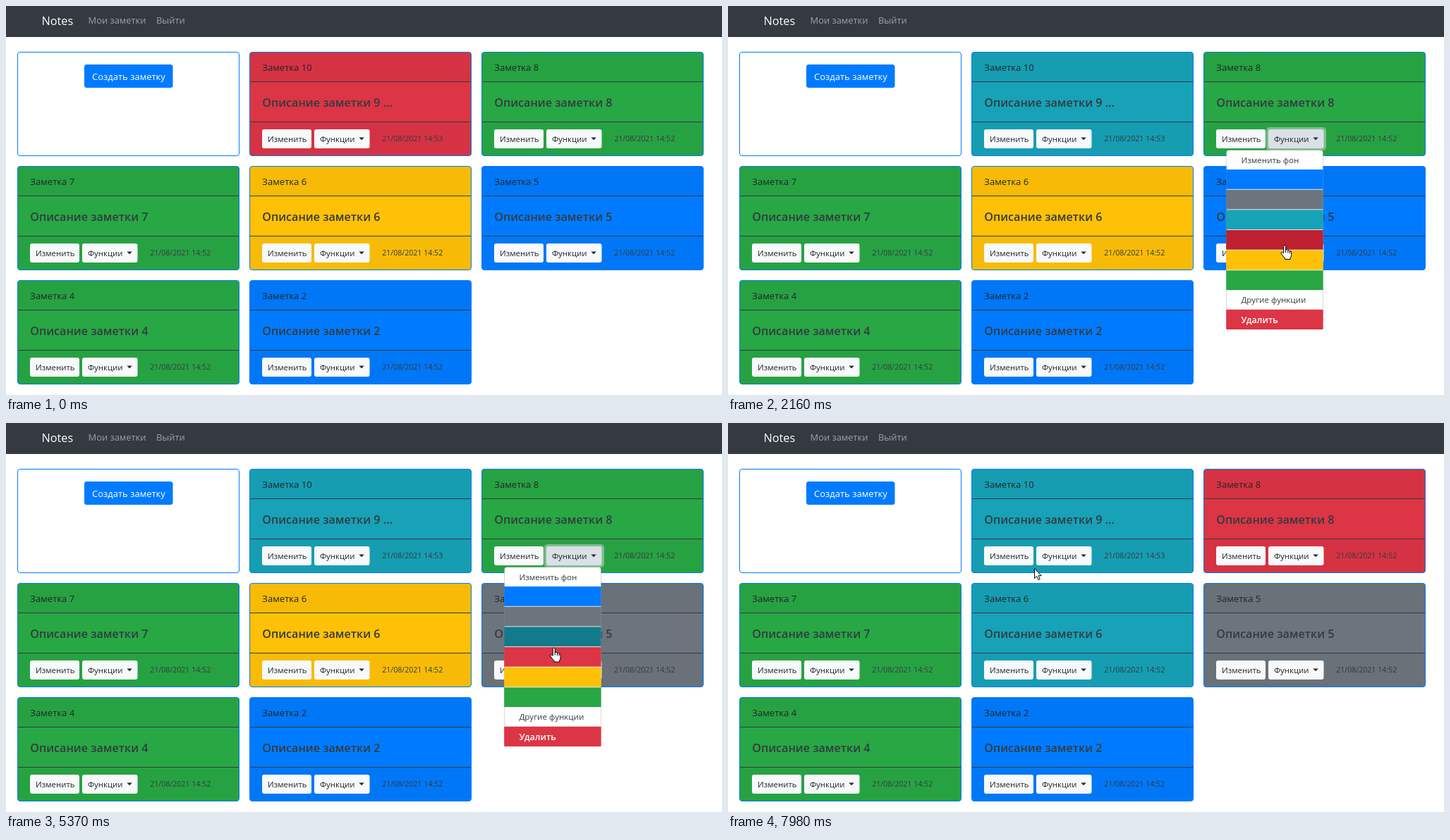
Write an HTML page that moves like this. It is 1015 px wide and 552 px high and loops after 8000 ms.

```html
<!DOCTYPE html>
<html lang="ru">
<head>
<meta charset="utf-8">
<title>Notes</title>
<style>
html, body { margin: 0; width: 100%; height: 100%; overflow: hidden; background: #fff; }
svg { display: block; width: 1015px; height: 552px; font-family: "Open Sans", "Noto Sans", sans-serif; }
text { fill: #343a40; white-space: pre; }
.brand { font-size: 16.3px; font-weight: 500; fill: #fff; }
.link { font-size: 12.9px; fill: #9fa2a5; }
.create { font-size: 13px; fill: #fff; }
.title { font-size: 13.1px; fill: #212529; }
.head { font-size: 16.1px; font-weight: 600; }
.small { font-size: 11.4px; fill: #212529; }
.date { font-size: 10.6px; }
.group { font-size: 11.6px; font-weight: 500; }
.delete { font-size: 12.5px; font-weight: 600; fill: #fff; }
.line { stroke: #343a40; }
.ring { fill: #d8d9db; fill-opacity: .5; }
</style>
</head>
<body>
<svg id="stage" viewBox="0 0 1015 552"></svg>
<script>
const LOOP = 8000, PITCH = 28.65, CLICK = 100, RELOAD = 110;
const BLUE = '#007bff', GRAY = '#6c757d', TEAL = '#17a2b8', RED = '#dc3545', YELLOW = '#ffc107', GREEN = '#28a745';

const swatches = [
  [BLUE, '#0062cc'], [GRAY, '#545b62'], [TEAL, '#117a8b'],
  [RED, '#bd2130'], [YELLOW, '#d39e00'], [GREEN, '#1e7e34']
];
const colors = [RED, GREEN, GREEN, YELLOW, BLUE, GREEN, BLUE];
const numbers = [10, 8, 7, 6, 5, 4, 2];

// Each visit opens a card's menu, glides to a row, then picks one; without a pick it closes by the button.
const visits = [
  { card: 0, open: 760, look: 2, reach: 400, pick: 2, close: 1440 },
  { card: 1, open: 1790, look: 7, reach: 620, close: 2920 },
  { card: 4, open: 3320, look: 3, reach: 620, pick: 1, close: 4270 },
  { card: 1, open: 5000, look: 3, reach: 400, pick: 3, close: 5750 },
  { card: 3, open: 6545, look: 2, reach: 400, pick: 2, close: 7345 }
];

const cardX = i => 16 + 329 * ((i + 1) % 3);
const cardY = i => 65 + 162 * Math.floor((i + 1) / 3);
const rowY = k => 167 + PITCH * k;

const buttonPoint = i => [cardX(i) + 136, cardY(i) + 120];
const rowPoint = (i, k) => [cardX(i) + 102, cardY(i) + rowY(k) + 4];

const path = [[0, 975, 575]];
for (const { card, open, look, reach, pick, close } of visits) {
  const end = pick === undefined ? buttonPoint(card) : rowPoint(card, pick);
  path.push(
    [open - 150, ...buttonPoint(card)], [open + 30, ...buttonPoint(card)],
    [open + reach, ...rowPoint(card, look)],
    [close - 150, ...end], [close, ...end]);
}
path.push([7680, 182, 318], [7980, 434, 206], [LOOP, 434, 206]);

const rect = (x, y, w, h, attrs) => `<rect x="${x}" y="${y}" width="${w}" height="${h}" ${attrs}/>`;
const text = (x, y, cls, str) => `<text x="${x}" y="${y}" class="${cls}">${str}</text>`;
const frame = attrs => rect(.5, .5, 314, 147, `rx="3.5" stroke="${BLUE}" ${attrs}`);

const card = (n, i) => `<g transform="translate(${cardX(i)} ${cardY(i)})">
  ${frame(`id="card${i}"`)}
  ${rect(1, 1, 313, 41, 'rx="3" fill-opacity=".03"')}
  ${rect(1, 100, 313, 47, 'rx="3" fill-opacity=".03"')}
  <path class="line" d="M1 42.5H314M1 99.5H314"/>
  ${text(18.3, 27, 'title', 'Заметка ' + n)}
  ${text(18.3, 78, 'head', 'Описание заметки ' + (i ? n : '9 ...'))}
  ${rect(89, 107, 85, 33, `rx="5" class="ring" id="ring${i}"`)}
  ${rect(18, 110, 70, 27, `rx="3" id="edit${i}"`)}
  ${rect(92, 110, 78.5, 27, `rx="3" id="drop${i}"`)}
  ${text(26, 128, 'small', 'Изменить')}
  ${text(100, 128, 'small', 'Функции')}
  <path d="M155.4 121.4h7.4l-3.7 3.8z" fill="#212529"/>
  ${text(188.2, 127.4, 'date', '21/08/2021 14:' + (i ? 52 : 53))}
</g>`;

const menu = `<g id="menu">
  ${rect(32.5, 139.5, 137, 254, 'rx="3.5" fill="#fff" stroke="#000" stroke-opacity=".15"')}
  ${swatches.map((s, k) => rect(32.2, rowY(k), 137.4, 27.8, `id="row${k}"`)).join('')}
  ${rect(32.2, 365.8, 137.4, 28.2, `rx="1" fill="${RED}"`)}
  ${text(53.4, 157.8, 'group', 'Изменить фон')}
  ${text(53.4, 356.2, 'group', 'Другие функции')}
  ${text(53.4, 384.7, 'delete', 'Удалить')}
</g>`;

const pointer = `<g id="pointer" stroke="#000" fill="#fff" stroke-linejoin="round">
  <circle id="click" r="11" fill="#e6d21a" fill-opacity=".8" stroke="none"/>
  <path id="arrow" d="M.5 .5V14.5L3.7 11.5L6 16.6L8.2 15.6L6 10.7H10.3Z"/>
  <path id="hand" d="M-1.4 10.5V1.2Q-1.4-.5 0-.5T1.6 1.2V6Q4.2 5 4.8 6.8Q7 6 7.4 7.8Q9.5 7.4 9.5 9.4V13.5Q9.4 16 8 17.5V19.5H.5V18Q-2.2 15-4.8 11.5Q-5.4 9.6-3.8 9.4Q-2.6 9.4-1.4 10.8M1.6 6V10M4.8 7V10.5M7.4 8V11"/>
</g>`;

document.getElementById('stage').innerHTML =
  rect(0, 0, 1015, 44, 'fill="#343a40"') +
  text(50.5, 27, 'brand', 'Notes') +
  text(116.5, 25.2, 'link', 'Мои заметки') + text(213, 25.2, 'link', 'Выйти') +
  `<g transform="translate(${cardX(-1)} ${cardY(-1)})">${frame('fill="#fff"')}</g>` +
  rect(111, 83, 125.5, 33, `rx="3.5" fill="${BLUE}"`) +
  text(122, 105, 'create', 'Создать заметку') +
  numbers.map(card).join('') + menu + pointer;

const el = id => document.getElementById(id);
const show = (id, on) => el(id).setAttribute('visibility', on ? 'visible' : 'hidden');
const fill = (id, color) => el(id).setAttribute('fill', color);
const move = (id, x, y) => el(id).setAttribute('transform', `translate(${x} ${y})`);

function pointerAt(t) {
  const i = path.findIndex(p => p[0] > t);
  const [t0, x0, y0] = path[i - 1], [t1, x1, y1] = path[i];
  const u = (t - t0) / (t1 - t0), s = u * u * (3 - 2 * u);
  return [x0 + (x1 - x0) * s, y0 + (y1 - y0) * s];
}

const inside = (x, y, left, top, w, h) => x >= left && x < left + w && y >= top && y < top + h;

function hoverAt([x, y], open) {
  if (open >= 0) {
    const mx = x - cardX(open), my = y - cardY(open);
    if (inside(mx, my, 32, 139, 138, 255)) {
      const k = Math.floor((my - rowY(0)) / PITCH);
      return k < 0 || k === swatches.length ? '' : 'row' + k;
    }
  }
  for (let i = 0; i < numbers.length; i++) {
    const cx = x - cardX(i), cy = y - cardY(i);
    if (inside(cx, cy, 18, 110, 70, 27)) return 'edit' + i;
    if (inside(cx, cy, 92, 110, 78.5, 27)) return 'drop' + i;
  }
  return '';
}

function draw() {
  const t = performance.now() % LOOP;
  const cardDuring = (before, after) =>
    visits.find(v => t >= v.open - before && t < v.close + after)?.card ?? -1;
  const open = cardDuring(0, 0), focus = cardDuring(55, RELOAD);
  const hover = hoverAt(pointerAt(Math.max(0, t - 30)), open);

  numbers.forEach((n, i) => {
    const paint = visits.find(v => v.card === i && v.pick !== undefined && t >= v.close + RELOAD);
    fill('card' + i, paint ? swatches[paint.pick][0] : colors[i]);
    show('ring' + i, focus === i);
    fill('edit' + i, hover === 'edit' + i ? '#e2e6ea' : '#f8f9fa');
    fill('drop' + i, open === i ? '#dae0e5' : focus === i || hover === 'drop' + i ? '#e2e6ea' : '#f8f9fa');
  });

  show('menu', open >= 0);
  if (open >= 0) move('menu', cardX(open), cardY(open));
  swatches.forEach(([base, dark], k) => fill('row' + k, hover === 'row' + k ? dark : base));

  move('pointer', ...pointerAt(t));
  show('click', visits.some(v => [v.open, v.close].some(c => t >= c - CLICK && t < c)));
  show('hand', hover);
  show('arrow', !hover);
  requestAnimationFrame(draw);
}
draw();
</script>
</body>
</html>
```
